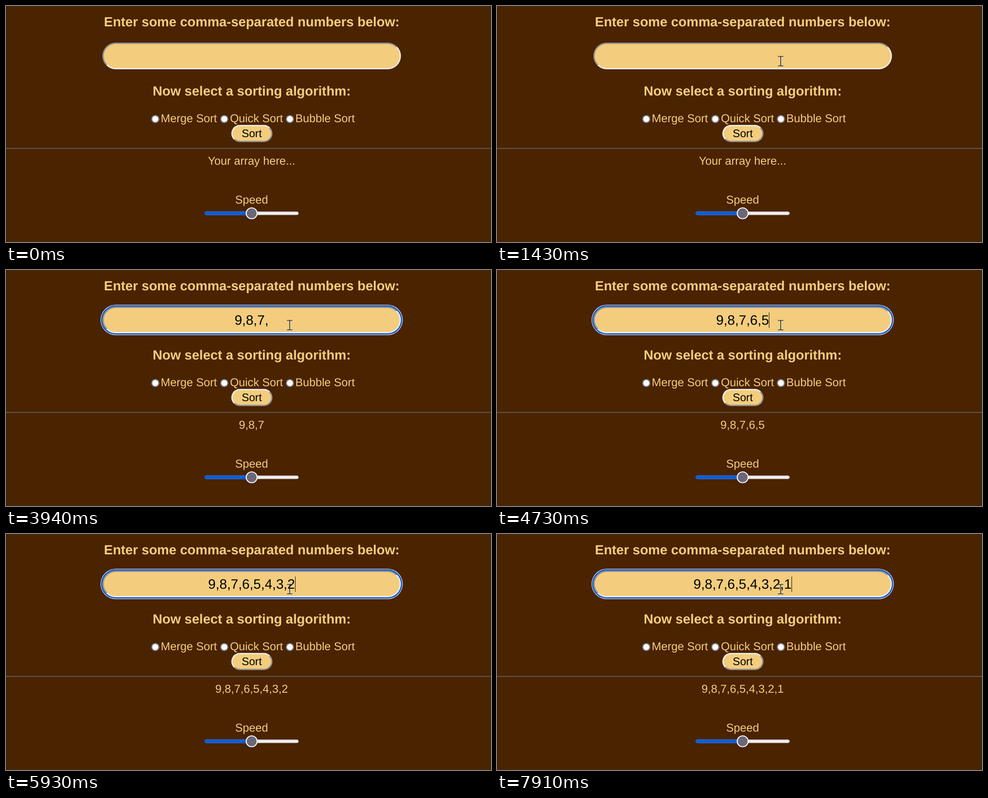
These frames come from a looping animation (1072x522 px, 8 s). An HTML page:

```html
<!DOCTYPE html>
<html lang="en">
<head>
<meta charset="utf-8">
<title>Sorting form</title>
<style>
  html, body { margin: 0; width: 100%; height: 100%; overflow: hidden; background: #4a2300; }
  .box { position: absolute; box-sizing: border-box; border: 3px solid; background: #f3cd7d; }
  #field { left: 213px; top: 81px; width: 660px; height: 59px; border-radius: 30px;
    border-color: #949494 #ebe9e6 #ebe9e6 #949494; }
  #field.focus { box-shadow: 0 0 0 3px #0f58cb, 0 0 0 4px #fff; }
  #button { left: 498px; top: 263px; width: 91px; height: 38px; border-radius: 19px;
    border-color: #ebe9e6 #949494 #949494 #ebe9e6; }
  svg { position: absolute; left: 0; top: 0; }
  text { font: 25.15px "Liberation Sans", Arial, sans-serif; fill: #f4ce7e;
    text-rendering: geometricPrecision; }
  .mid { text-anchor: middle; }
  .head { font-size: 29.4px; font-weight: bold; }
  .dark { fill: #000; }
  .radio { fill: #fff; stroke: #767a82; stroke-width: 2.4; }
</style>
</head>
<body>
<div id="field" class="box"></div>
<div id="button" class="box"></div>
<svg width="1072" height="522">
  <path d="M.5 0V522" stroke="#3d1c00"/>
  <text class="mid head" x="543.2" y="45">Enter some comma-separated numbers below:</text>
  <text class="mid head" x="543.2" y="198">Now select a sorting algorithm:</text>
  <circle class="radio" cx="330" cy="250" r="7.9"/>
  <text x="342" y="257">Merge Sort</text>
  <circle class="radio" cx="482.5" cy="250" r="7.9"/>
  <text x="495" y="257">Quick Sort</text>
  <circle class="radio" cx="627.5" cy="250" r="7.9"/>
  <text x="639.5" y="257">Bubble Sort</text>
  <text class="mid dark" x="543.2" y="290" style="font-size:24.2px">Sort</text>
  <path d="M0 315H1072" stroke="#6b6779" stroke-width="1.6"/>
  <text id="output" class="mid" x="542.8" y="351"></text>
  <text class="mid" x="542.8" y="437">Speed</text>
  <rect x="439.5" y="455" width="207" height="7" rx="3.5" fill="#efefef" stroke="#b0aca8"/>
  <path d="M543 454.5H443a4 4 0 0 0 0 8H543z" fill="#0a5fda"/>
  <circle cx="543" cy="458.5" r="12" fill="#6b6779" stroke="#fff" stroke-width="2.2"/>
  <text id="typed" class="mid dark" x="542.7" y="121" style="font-size:30px"></text>
  <rect id="caret" y="94" width="1" height="34"/>
  <path id="arrow" d="M.5 .5V19.5L5 15.3L8 22.3L11.2 20.9L8.2 14.2H14.5z" fill="#fff" stroke="#000"/>
  <path id="beam" d="M-6 -10.5H-1.5L0 -9.5L1.5 -10.5H6M0 -9.5V9.5M-6 10.5H-1.5L0 9.5L1.5 10.5H6"
    fill="none" stroke="#14305f" stroke-width="1.6"/>
</svg>
<script>
const $ = id => document.getElementById(id);
const LOOP = 8000, FONT = 30, MID = 542.7;
const DIGITS = "9,8,7,6,5,4,3,2,1,";
// Moment at which each further character appears
const KEYS = [2610, 2880, 3210, 3410, 3740, 3940, 4330, 4530, 4730, 4930,
              5130, 5330, 5530, 5730, 5930, 6060, 6190, 7190];
const ERASE = 7910;
// Spans in which the caret is hidden
const HIDDEN = [[0, 1820], [2350, 2610], [2880, 3210], [3940, 4070], [6590, 7120], [7650, ERASE]];
// Pointer path: time, x, y
const PATH = [[460, 956, 500], [800, 765, 310], [1080, 623, 188], [1150, 618, 165],
              [1220, 637, 140], [1290, 636, 127], [1430, 627, 122]];

function pointer(t) {
  const step = 69.1;
  const s = t < 1290 ? 460 + Math.floor((t - 460 + 1) / step) * step
                     : 1290 + Math.floor((t - 1290) / 70) * 70;
  const i = PATH.findIndex(p => p[0] > s);
  if (i < 0) return PATH[PATH.length - 1].slice(1);
  if (i === 0) return PATH[0].slice(1);
  const a = PATH[i - 1], b = PATH[i], k = (s - a[0]) / (b[0] - a[0]);
  return [a[1] + (b[1] - a[1]) * k, a[2] + (b[2] - a[2]) * k];
}

function place(id, visible, x, y) {
  $(id).style.display = visible ? "" : "none";
  $(id).setAttribute("transform", `translate(${x} ${y})`);
}

function message(value) {
  if (!value) return "Your array here...";
  if (value === DIGITS) return "Please enter up to 9 numbers.";
  return value.replace(/,$/, "");
}

function draw(t) {
  let count = KEYS.filter(k => t >= k).length;
  if (t >= ERASE) count--;
  const value = DIGITS.slice(0, count);
  $("typed").textContent = value;
  $("output").textContent = message(value);
  $("field").classList.toggle("focus", t >= 1760);

  // Digits are 0.556 em wide, commas 0.278 em
  const width = FONT * (Math.ceil(count / 2) * .556 + Math.floor(count / 2) * .278);
  const hidden = HIDDEN.some(([from, to]) => t >= from && t < to);
  place("caret", !hidden, Math.round(MID + width / 2), 0);

  const [x, y] = pointer(t);
  place("arrow", t >= 460 && t < 1290, x, y);
  place("beam", t >= 1290, x, y);
}

function frame(now) {
  draw(now % LOOP);
  requestAnimationFrame(frame);
}
draw(0);
requestAnimationFrame(frame);
</script>
</body>
</html>
```
